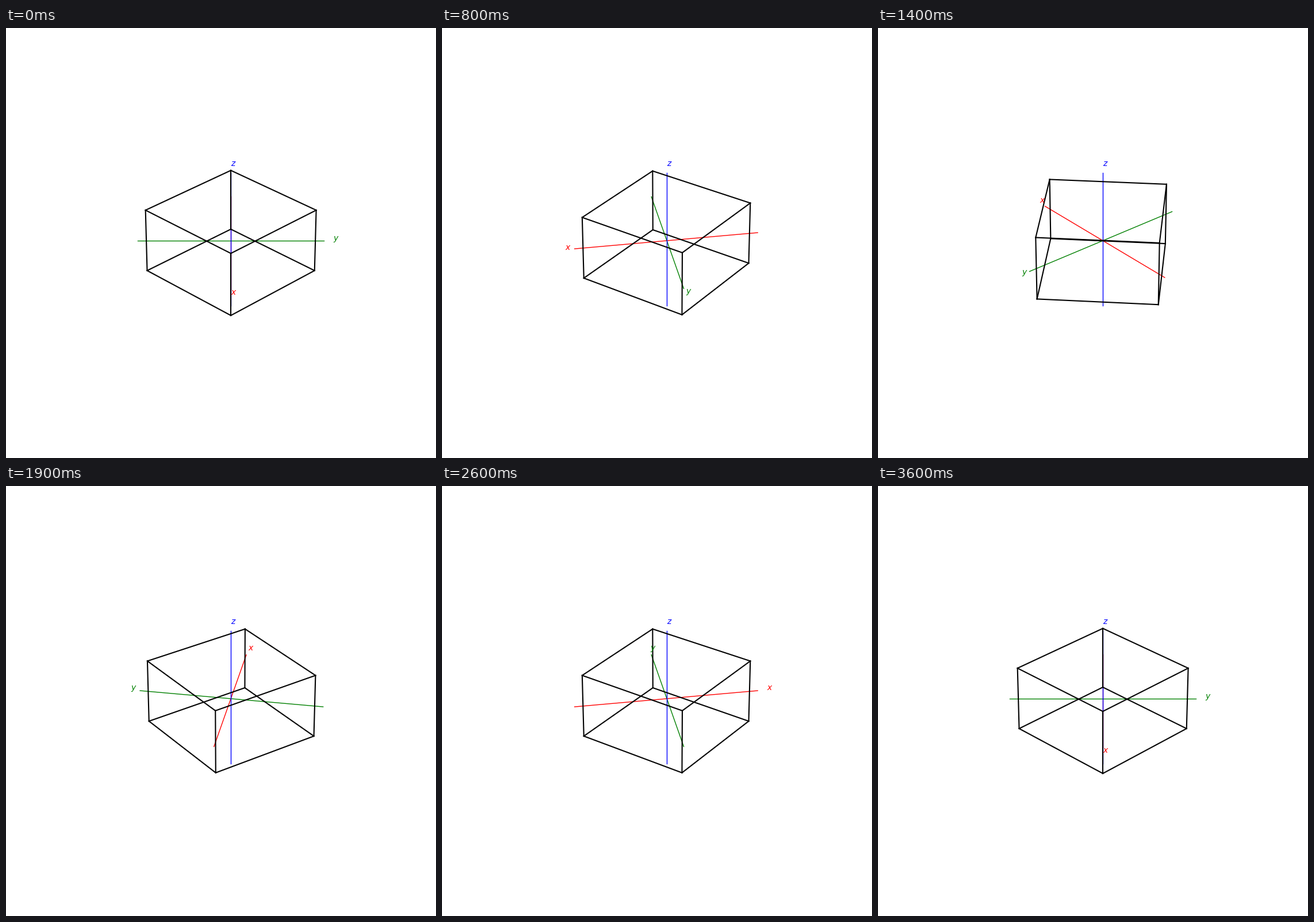
These frames come from a looping animation (748x748 px, 3.7 s). A matplotlib script:

```python
import itertools

import matplotlib.pyplot as plt
import numpy as np
from matplotlib.animation import FuncAnimation

SIZE, DPI = 748, 100
FRAMES, INTERVAL = 37, 100
STEP = 10                          # degrees of azimuth per frame
ELEV = np.radians(30)
CENTER = np.array([391.13, 369.96])
UNIT = 0.77 * SIZE / 1.85          # pixels per world unit at the centre
DIST = 10                          # camera distance in world units

HALF_XY, HALF_Z = 0.5714, 0.4286
RADIUS = HALF_XY / 1.21            # box corners lie on the x and y axes
HEIGHT = HALF_Z / 2.2
AXIS = np.array([HALF_XY / 1.1, HALF_XY / 1.1, HALF_Z])
LABEL = 1.1 * AXIS
COLORS = ("red", "green", "blue")


def project(points, azim):
    """Perspective view of world points, in pixels from the top left."""
    x, y, z = np.asarray(points, float).T
    ca, sa = np.cos(azim), np.sin(azim)
    front = x * ca + y * sa
    right = y * ca - x * sa
    up = z * np.cos(ELEV) - front * np.sin(ELEV)
    near = front * np.cos(ELEV) + z * np.sin(ELEV)
    scale = UNIT * DIST / (DIST - near)
    return CENTER[0] + right * scale, CENTER[1] - up * scale


def box_edges():
    ring = RADIUS * np.array([(1, 0), (0, 1), (-1, 0), (0, -1)])
    top, bottom = ([(*p, z) for p in ring] for z in (HEIGHT, -HEIGHT))
    rings = [(face[i], face[(i + 1) % 4])
             for face, i in itertools.product((top, bottom), range(4))]
    return rings + list(zip(top, bottom))


fig = plt.figure(figsize=(SIZE / DPI, SIZE / DPI), dpi=DPI, facecolor="white")
ax = fig.add_axes([0, 0, 1, 1])
ax.set_xlim(0, SIZE)
ax.set_ylim(SIZE, 0)
ax.axis("off")

segments, labels = [], []


def add_segment(ends, color, width):
    line, = ax.plot([], [], color=color, lw=width,
                    solid_capstyle="projecting")
    segments.append((line, ends))


for name, color, direction in zip("xyz", COLORS, np.eye(3)):
    add_segment((-AXIS * direction, AXIS * direction), color, 1)
    text = ax.text(0, 0, f"${name}$", color=color, fontsize=10)
    labels.append((text, LABEL * direction))

for edge in box_edges():
    add_segment(edge, "black", 1.5)


def draw(i):
    azim = np.radians(i * STEP % 360)
    for line, ends in segments:
        line.set_data(*project(ends, azim))
    for text, point in labels:
        (x,), (y,) = project([point], azim)
        text.set_position((x, y))
    return [artist for artist, _ in segments + labels]


anim = FuncAnimation(fig, draw, frames=FRAMES, interval=INTERVAL,
                     repeat=True, repeat_delay=0)
plt.show()
```
